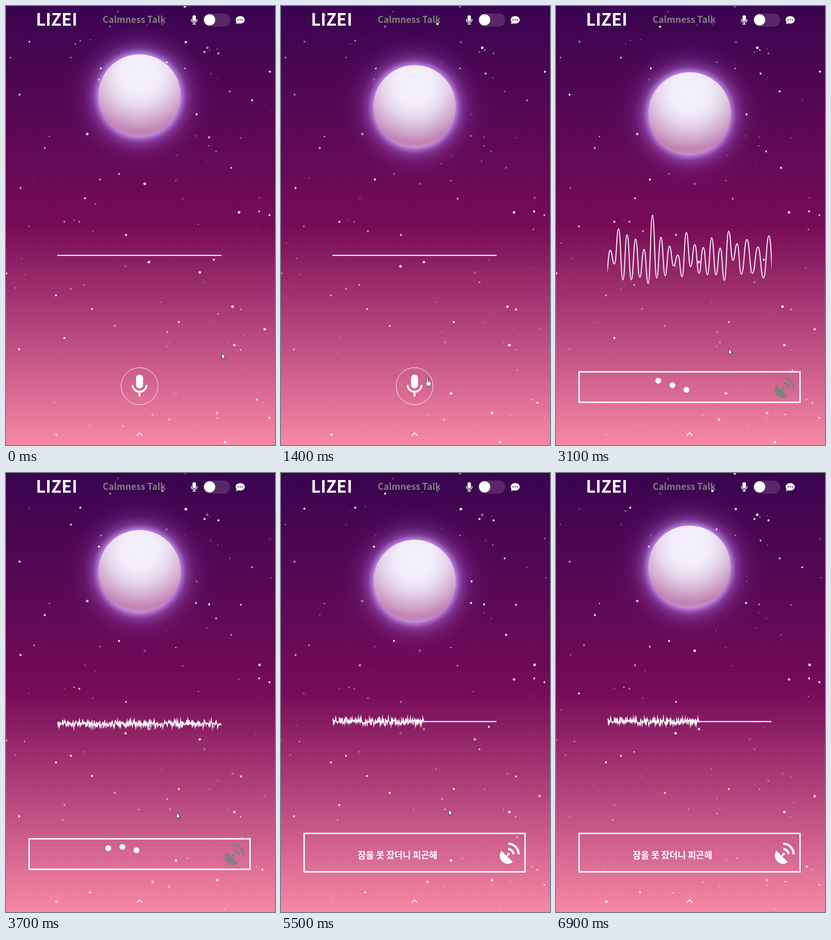
Recreate the animation shown at these times as an HTML page with a canvas. Size 576 px wide and 936 px high, loop 7000 ms.

```html
<!DOCTYPE html>
<html lang="ko">
<head>
<meta charset="utf-8">
<style>
html, body { margin: 0; width: 100%; height: 100%; overflow: hidden; background: #3a0450; }
canvas { display: block; }
</style>
</head>
<body>
<canvas id="stage" width="576" height="936"></canvas>
<script>
const ctx = document.getElementById('stage').getContext('2d');
const FONT = '"Noto Sans CJK KR", "Noto Sans", sans-serif';
const TAU = Math.PI * 2;
const CLICK = 1.7, SPEECH = [2.2, 3.4], ANSWER = 5, CURSOR_END = 6.2;

const hash = n => { const v = Math.sin(n * 127.1 + 3.7) * 43758.5453; return v - Math.floor(v); };

// CSS "ease": cubic-bezier(.25, .1, .25, 1)
function ease(x) {
  let lo = 0, hi = 1, s = 0.5;
  for (let i = 0; i < 24; i++) {
    s = (lo + hi) / 2;
    const bx = 0.75 * s * (1 - s) + s ** 3;
    if (bx < x) lo = s; else hi = s;
  }
  return 0.3 * s * (1 - s) ** 2 + 3 * s * s * (1 - s) + s ** 3;
}

function disc(x, y, r, fill = '#fff') {
  ctx.fillStyle = fill;
  ctx.beginPath();
  ctx.arc(x, y, r, 0, TAU);
  ctx.fill();
}

function stroke(path, width, color = '#fff') {
  ctx.strokeStyle = color;
  ctx.lineWidth = width;
  ctx.stroke(new Path2D(path));
}

function fill(path, color = '#fff') {
  ctx.fillStyle = color;
  ctx.fill(new Path2D(path));
}

function at(x, y, draw) {
  ctx.save();
  ctx.translate(x, y);
  draw();
  ctx.restore();
}

function gradient(g, stops) {
  stops.forEach(([p, c]) => g.addColorStop(p, c));
  return g;
}

function text(str, x, y, size, color, align = 'left') {
  ctx.font = `bold ${size}px ${FONT}`;
  ctx.fillStyle = color;
  ctx.textAlign = align;
  ctx.fillText(str, x, y);
}

// Large stars first, then medium ones; tiny ones are scattered.
const LARGE = 20;
const SPOTS = [
  385,77, 174,273, 297,379, 499,440, 306,546, 485,641, 543,409, 256,555, 554,689, 415,568,
  431,89, 335,38, 314,872, 469,930, 383,1, 108,914, 452,868, 364,826, 489,723, 349,882,
  503,647, 425,589, 482,345, 242,358, 201,370, 435,280, 351,717, 233,682, 370,674, 125,708,
  107,617, 184,646, 378,411, 157,460, 479,182, 408,231, 50,76, 445,541, 564,446, 407,277,
  223,44, 159,74, 139,110, 31,388, 450,310, 49,470, 455,101, 527,201, 565,140, 125,460,
  169,410, 438,144, 257,488, 186,480, 549,846, 139,603, 345,695, 180,894, 542,438, 1,570,
  425,98, 83,303, 29,189, 564,878, 28,732, 537,839, 503,281, 203,133, 199,157, 344,120
];
const stars = Array.from({ length: 118 }, (_, i) => {
  const listed = 2 * i < SPOTS.length;
  return {
    x: listed ? SPOTS[2 * i] : hash(i) * 576,
    y: listed ? SPOTS[2 * i + 1] : hash(i + 500) * 936,
    r: i < LARGE ? 2.8 : listed ? 2.2 : 0.8 + hash(i + 900) * 0.7,
    phase: hash(i + 200) * TAU,
    speed: 2 + hash(i + 300) * 2.5
  };
});

function drawStars(t) {
  for (const s of stars) {
    ctx.globalAlpha = 0.55 + 0.4 * Math.sin(s.phase + s.speed * t);
    disc(s.x, s.y, s.r);
  }
  ctx.globalAlpha = 1;
}

const sky = gradient(ctx.createLinearGradient(0, 0, 0, 936),
  [[0, '#390450'], [0.5, '#760b58'], [1, '#f888a5']]);
const glow = gradient(ctx.createRadialGradient(0, 0, 84, 0, 0, 170), [
  [0, 'rgba(215,165,255,.95)'], [0.08, 'rgba(200,145,245,.75)'], [0.2, 'rgba(180,115,225,.42)'],
  [0.4, 'rgba(160,85,200,.2)'], [0.7, 'rgba(140,50,160,.06)'], [1, 'rgba(130,40,150,0)']]);
const ball = gradient(ctx.createRadialGradient(0, -45, 0, 0, -45, 136), [
  [0, '#f5f0fd'], [0.3, '#f2edfa'], [0.5, '#e6d8ec'], [0.72, '#d3accf'],
  [0.9, '#c281b4'], [0.96, '#c58bbb'], [1, '#d7acd6']]);

function drawMoon(t) {
  const half = 1.118, cycle = t / half;
  const p = ease(cycle % 1);
  const y = 191 + 39.5 * (Math.floor(cycle) % 2 ? 1 - p : p);
  at(286, y, () => disc(0, 0, 170, glow));
  drawStars(t);
  at(286, y, () => disc(0, 0, 88, ball));
}

function drawHeader() {
  text('LIZEI', 64, 42, 36, '#fff');
  text('Calmness Talk', 274.5, 36, 19.2, '#808080', 'center');
  at(403, 20, () => {
    fill('M-3.7 3.5a3.7 3.7 0 0 1 7.4 0v6a3.7 3.7 0 0 1-7.4 0z');
    stroke('M-6 8v1.5a6 6 0 0 0 12 0V8M0 15.5v3M-3.5 18.6h7', 1.7);
  });
  ctx.fillStyle = 'rgba(255,255,255,.14)';
  ctx.beginPath();
  ctx.roundRect(422, 16, 58, 28, 14);
  ctx.fill();
  disc(436, 29.5, 12);
  fill('M501.500 21.500c5.500 0 9.700 3.600 9.700 8s-4.200 8-9.700 8c-1.600 0-3-.3-4.300-.8-1.300 1-3.200 1.800-5.200 1.800 1-1.200 1.700-2.500 1.800-3.800-1.300-1.400-2-3.200-2-5.200 0-4.400 4.300-8 9.700-8z');
  [-4.5, 0, 4.5].forEach(dx => disc(501.5 + dx, 29.5, 1.3, '#420452'));
}

function polyline(points) {
  ctx.strokeStyle = '#fff';
  ctx.beginPath();
  points.forEach(([x, y]) => ctx.lineTo(x, y));
  ctx.stroke();
}

function noise(y, end, seed) {
  const points = [];
  for (let x = 110, i = 0; x < end; x += 0.8, i++) {
    const level = hash(i + seed * 31) < 0.45 ? 4 : 9;
    points.push([x, y + (hash(i * 1.7 + seed) - 0.5) * 2 * level]);
  }
  ctx.lineWidth = 1.8;
  polyline(points);
}

const PEAKS = [
  515, 573, 494, 573, 516, 585, 480, 542, 507, 572, 498, 570, 514, 580, 521, 550, 475, 584,
  488, 584, 497, 578, 519, 592, 446, 580, 493, 575, 512, 554, 531, 577, 483, 556, 509, 570
];

function speech(tick) {
  const shift = ((tick - 26) * 10 % 36 + 36) % 36;
  const points = [[107, 573]];
  for (let i = 0; i <= 36; i++) {
    const x = i < 32 ? 116 + 9.06 * i : 397 + 11.8 * (i - 31);
    points.push([x, i < 36 ? PEAKS[(i + shift) % 36] : 490]);
  }
  points.push([466, 575]);
  ctx.save();
  ctx.beginPath();
  ctx.rect(110, 420, 352, 200);
  ctx.clip();
  ctx.lineWidth = 2.3;
  ctx.strokeStyle = '#f6e6f1';
  ctx.beginPath();
  points.forEach(([x, y], i) => {
    if (!i) return ctx.moveTo(x, y);
    const [px, py] = points[i - 1], mid = (x + px) / 2;
    ctx.bezierCurveTo(mid, py, mid, y, x, y);
  });
  ctx.stroke();
  ctx.restore();
}

function drawSignal(t, tick) {
  if (t < CLICK) stroke('M110 531.700H461.500', 2.6, '#faeef6');
  else if (t >= ANSWER) {
    noise(529.5, 307, 7);
    stroke('M307 530H461.500', 2.4, '#faeef6');
  } else if (t >= SPEECH[0] && t < SPEECH[1]) speech(tick);
  else noise(535, 461.5, tick);
}

function drawMicButton() {
  ctx.strokeStyle = '#fff';
  ctx.lineWidth = 1;
  ctx.beginPath();
  ctx.arc(286, 810.5, 39.5, 0, TAU);
  ctx.stroke();
  at(286, 786, () => {
    fill('M-7.500 7.200a7.500 7.500 0 0 1 15 0v14.500a7.500 7.500 0 0 1-15 0z');
    stroke('M-15 22a15 14.500 0 0 0 30 0M0 36v10.500', 4);
  });
}

function drawDish(dy, color) {
  at(0, dy, () => {
    fill('M472 805.500L496.500 829.500A17.300 17.300 0 0 1 472 805.500Z', color);
    stroke('M483 818L487 813', 2.5, color);
    disc(487.2, 812.5, 2.8, color);
    stroke('M486.500 801.500A12.500 12.500 0 0 1 498 813M486.500 790.500A22 22 0 0 1 508.800 813', 4.6, color);
  });
}

function drawBox(t) {
  const answered = t >= ANSWER;
  const [top, height] = answered ? [768.5, 82] : [780, 65];
  ctx.strokeStyle = '#fff';
  ctx.lineWidth = 3;
  ctx.strokeRect(49.5, top, 473, height);
  drawDish(answered ? 0 : 2.5, answered ? '#fff' : '#808080');
  if (answered) return text('잠을 못 잤더니 피곤해', 249.5, 821.5, 19, '#fff', 'center');
  for (let i = 0; i < 3; i++) {
    const angle = (221 + 124 * (t - 3.7) - 54 * i) * Math.PI / 180;
    disc(219 + 30.2 * i, 809 + 12 * Math.cos(angle), 6.2);
  }
}

const CURSOR = [
  [0, 462, 740], [0.3, 462, 740], [1.3, 313, 793], [1.8, 313, 793],
  [2.5, 372, 734], [2.7, 372, 734], [3.7, 365, 724], [4.4, 359, 717], [7, 359, 717]
];

function drawCursor(t) {
  if (t >= CURSOR_END) return;
  const i = CURSOR.findIndex(k => k[0] > t);
  const [t0, x0, y0] = CURSOR[i - 1], [t1, x1, y1] = CURSOR[i];
  const u = (t - t0) / (t1 - t0), p = u * u * (3 - 2 * u);
  const x = x0 + (x1 - x0) * p, y = y0 + (y1 - y0) * p;
  const overButton = t < CLICK && Math.hypot(x - 286, y - 810.5) < 40;
  const shape = overButton
    ? 'M-1.500 1Q0 -.500 1.500 1V6.500Q3 5.500 4 7Q5.500 6 6.500 7.700Q8.500 7 8.700 9V13L7 17.500H0L-4 11.500Q-4 9 -1.500 11Z'
    : 'M0 0V12.500L2.800 9.900L4.800 14.300L6.800 13.400L4.900 9.200H8.500Z';
  at(x, y, () => {
    fill(shape);
    stroke(shape, 1, '#28202c');
    if (overButton) stroke('M1.500 6V10M4 7V10M6.500 8V10', 0.6, '#28202c');
  });
}

function frame() {
  const tick = Math.floor(performance.now() % 7000 / 100), t = tick / 10;
  ctx.fillStyle = sky;
  ctx.fillRect(0, 0, 576, 936);
  drawMoon(t);
  drawHeader();
  drawSignal(t, tick);
  if (t < CLICK) drawMicButton(); else drawBox(t);
  stroke('M280 916L286 910L292 916', 2);
  drawCursor(t);
  requestAnimationFrame(frame);
}
frame();
</script>
</body>
</html>
```
